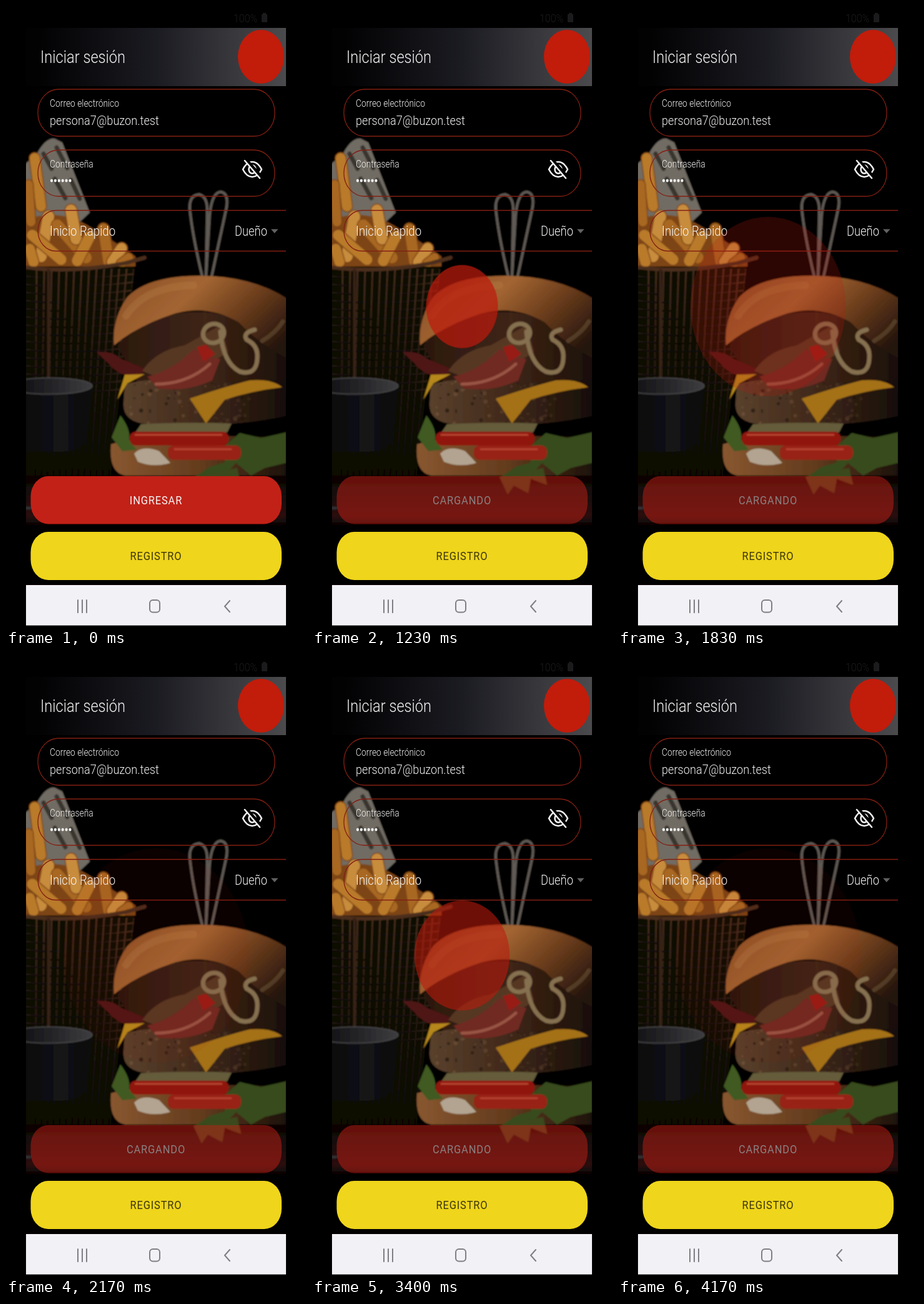
Recreate the animation shown at these times as an HTML page. Size 480 by 992 pixels, loop 4210 ms.

```html
<!DOCTYPE html>
<html lang="es">
<head>
<meta charset="utf-8">
<title>Iniciar sesión</title>
<style>
  html, body { margin: 0; width: 100%; height: 100%; overflow: hidden; background: #000; }
  svg { display: block; width: 100%; height: 100%; }
  text { font-family: Roboto, "Open Sans", sans-serif; font-weight: 300; fill: #f4f4f4; }
  .caps { font-size: 19px; letter-spacing: 1px; text-anchor: middle; font-weight: 400; }
  .field { fill: none; stroke: #821f12; stroke-width: 1.3; }
  .line { fill: none; stroke-linecap: round; stroke-linejoin: round; }
  #pulse { transform-origin: 240px 480px; opacity: 0; }
</style>
</head>
<body>
<svg viewBox="0 0 480 992">
  <defs>
    <linearGradient id="bar"><stop offset=".05" stop-color="#020203"/><stop offset=".5" stop-color="#1b1b22"/><stop offset="1" stop-color="#4b4b4e"/></linearGradient>
    <linearGradient id="bun" x1="0" y1=".2" x2="1" y2=".7"><stop stop-color="#8d5228"/><stop offset=".35" stop-color="#a36532"/><stop offset=".65" stop-color="#6b3d1c"/><stop offset="1" stop-color="#20120b"/></linearGradient>
    <linearGradient id="base"><stop stop-color="#885730"/><stop offset=".5" stop-color="#623b1d"/><stop offset="1" stop-color="#150d08"/></linearGradient>
    <linearGradient id="meat"><stop stop-color="#59412d"/><stop offset=".45" stop-color="#422a1b"/><stop offset="1" stop-color="#170e08"/></linearGradient>
    <linearGradient id="filling"><stop stop-color="#2b1810"/><stop offset=".5" stop-color="#3f2515"/><stop offset="1" stop-color="#170d08"/></linearGradient>
    <linearGradient id="mesh" x1="0" y1="0" x2="0" y2="1"><stop stop-color="#4a3020"/><stop offset=".5" stop-color="#271a12"/><stop offset="1" stop-color="#080504"/></linearGradient>
    <linearGradient id="bowl"><stop stop-color="#09090b"/><stop offset=".6" stop-color="#141417"/><stop offset="1" stop-color="#070708"/></linearGradient>
    <linearGradient id="inside"><stop stop-color="#09090c"/><stop offset="1" stop-color="#3d3d40"/></linearGradient>
    <linearGradient id="table" x1="0" y1="0" x2="0" y2="1"><stop stop-color="#020202"/><stop offset=".2" stop-color="#180a09"/><stop offset=".38" stop-color="#2c100f"/><stop offset=".46" stop-color="#050303"/><stop offset="1" stop-color="#070707"/></linearGradient>
    <filter id="soft" x="0" y="0" width="480" height="992" filterUnits="userSpaceOnUse"><feGaussianBlur stdDeviation="1"/></filter>
    <clipPath id="phone"><path d="M32 35H448V925H32Z"/></clipPath>
    <clipPath id="basketClip"><path d="M32 420H205L168 750H32Z"/></clipPath>
    <clipPath id="pattyClip"><path id="patty" d="M190 605Q230 590 300 604L448 596V655Q350 676 225 668Q186 664 188 634Z"/></clipPath>
  </defs>

  <rect width="480" height="992"/>
  <g clip-path="url(#phone)">
    <g filter="url(#soft)">
      <rect x="20" y="35" width="440" height="900" fill="#020202"/>
      <rect x="20" y="740" width="440" height="195" fill="url(#table)"/>
      <path d="M20 802H40" stroke="#303036" stroke-width="4"/>

      <!-- paper and fries -->
      <path d="M50 235Q64 210 78 212L90 218L134 330L70 390H20V262Z" fill="#716c64"/>
      <path d="M60 236l13 24M81 226l17 33M78 276l17 31M104 278l14 30" stroke="#38342f" stroke-width="7" class="line"/>
      <path d="M20 345Q80 320 130 350T207 400V416H20Z" fill="#7d4515"/>
      <g id="fries" class="line"></g>

      <!-- basket and bowl -->
      <path d="M20 416H205L168 750H20Z" fill="#0d0806"/>
      <g id="basket" clip-path="url(#basketClip)" stroke="url(#mesh)" stroke-width="2.4"></g>
      <path d="M20 416Q100 428 190 411L222 402" class="line" stroke="#4b2f1d" stroke-width="6"/>
      <path d="M68 420V600" stroke="#392417" stroke-width="5"/>
      <path d="M20 607H138L130 690Q122 711 90 712H20Z" fill="url(#bowl)"/>
      <ellipse cx="70" cy="607" rx="68" ry="13" fill="url(#inside)" stroke="#48484a" stroke-width="1.5"/>

      <!-- skewer -->
      <path d="M314 432Q298 365 294 324Q293 302 309 301Q322 304 322 326L320 432L326 332Q330 297 344 297Q356 299 353 321L329 432" class="line" stroke="#605a54" stroke-width="4"/>

      <!-- burger -->
      <path d="M168 700Q230 680 460 690V750H190Q164 745 168 700Z" fill="url(#base)"/>
      <path d="M178 542Q240 480 330 490L460 520V620H220Z" fill="url(#filling)"/>
      <use href="#patty" fill="url(#meat)"/>
      <g id="grain" clip-path="url(#pattyClip)"></g>
      <path d="M173 542Q169 500 194 465Q226 431 310 431Q400 431 460 474V568Q410 545 372 505Q318 474 262 494Q207 513 173 542Z" fill="url(#bun)"/>
      <path d="M192 495Q222 448 300 446" class="line" stroke="#bb8148" stroke-width="12" opacity=".3"/>
      <path d="M145 553Q170 550 183 563L221 579L214 596Q178 590 164 571Z" fill="#4f1512"/>
      <path d="M218 583Q240 550 286 542L343 510L355 552Q325 578 290 565L240 592Z" fill="#573721"/>
      <path d="M226 592Q270 581 300 548Q320 560 343 564L330 598Q290 617 243 611Z" fill="#702a22"/>
      <path d="M240 604Q290 604 326 572" class="line" stroke="#985544" stroke-width="5"/>
      <path d="M305 545L320 541L335 556L316 568Z" fill="#981c16"/>
      <g class="line" stroke="#857050" stroke-width="7">
        <ellipse cx="332" cy="523" rx="17" ry="15" transform="rotate(-20 332 523)"/>
        <path d="M343 520Q347 570 374 584Q401 591 402 563Q404 542 385 533Q378 522 398 517"/>
        <path d="M410 535Q432 522 443 504" opacity=".35"/>
      </g>
      <path d="M178 629L190 589L222 588L194 603Z" fill="#b6881c"/>
      <path d="M294 627Q354 607 390 598Q425 595 442 609Q392 615 350 629L320 667Z" fill="#a47119"/>
      <path d="M216 668Q300 664 361 667L354 681H207Z" fill="#655b3a"/>
      <path d="M183 654Q200 676 197 693L209 709L186 711L169 689Z" fill="#3f5a20"/>
      <path d="M350 703L374 682L408 690L448 681V730L414 738L392 750L368 730L347 752L303 752L326 736L350 729Z" fill="#374b1e"/>
      <path d="M300 752L313 780L323 766L346 778L350 755L376 765L370 738Z" fill="#3b481d"/>
      <path d="M205 715Q218 701 245 711L263 730Q235 738 211 728Z" fill="#b2a491"/>
      <rect x="198" y="680" width="158" height="22" rx="9" fill="#901811"/>
      <rect x="259" y="702" width="117" height="23" rx="9" fill="#982016"/>
      <path d="M207 685H345M270 708H360" stroke="#b64333" stroke-width="3" class="line"/>
    </g>

    <!-- form -->
    <rect x="32" y="35" width="416" height="93" fill="url(#bar)"/>
    <ellipse cx="408" cy="81" rx="37" ry="43" fill="#c21c0b"/>
    <rect class="field" x="51" y="133" width="379" height="75" rx="33" ry="37"/>
    <rect class="field" x="51" y="230" width="379" height="74" rx="33" ry="37"/>
    <rect class="field" x="51" y="326.500" width="430" height="65" rx="29" ry="32.500"/>
    <g id="dots" fill="#f4f4f4"></g>
    <g class="line" stroke="#f4f4f4" stroke-width="2.500">
      <path d="M379 261Q385 249 394 249T409 261Q403 273 394 273T379 261Z"/>
      <ellipse cx="394" cy="261" rx="5.500" ry="6.500"/>
      <path d="M384 246L409 274" stroke="#020202" stroke-width="6"/>
      <path d="M382 247L406 275"/>
    </g>
    <path d="M424 356.500H435.500L429.700 363Z" fill="#626265"/>
  </g>

  <g id="labels"></g>

  <ellipse id="pulse" cx="240" cy="480" rx="156" ry="180" fill="#bd1b0d"/>

  <g id="enter">
    <rect x="39.500" y="751" width="401.500" height="76.500" rx="28" ry="32.500" fill="#c22117"/>
    <text id="enterText" class="caps" transform="translate(240 795.500) scale(.865 1)"></text>
  </g>
  <rect x="39.500" y="840" width="401.500" height="77" rx="28" ry="32.500" fill="#efd51b"/>
  <text class="caps" transform="translate(240 885) scale(.865 1)" style="fill:#3d370e">REGISTRO</text>

  <rect x="32" y="925" width="416" height="64.500" fill="#f2f2f6"/>
  <g class="line" stroke="#7e7e84" stroke-width="2">
    <path d="M115 949V969M122 949V969M129 949V969M358 950L350 959L358 968"/>
    <rect x="230" y="949" width="16" height="19.500" rx="5"/>
  </g>
  <g fill="#1b1b1d"><rect x="409" y="13" width="9" height="13" rx="1"/><rect x="411" y="11" width="5" height="3"/></g>
</svg>

<script>
const $ = id => document.getElementById(id);
const SQUEEZE = 0.865; // the screen is shown narrower than it was laid out
const LOOP = 4210, PRESS = 500;

function add(parent, tag, attrs) {
  const el = document.createElementNS("http://www.w3.org/2000/svg", tag);
  for (const key in attrs) el.setAttribute(key, attrs[key]);
  return parent.appendChild(el);
}

// x, baseline, size, content, colour
const labels = [
  [55, 91, 27.3, "Iniciar sesión"],
  [70, 161, 16, "Correo electrónico"],
  [70, 190, 21, "persona7@buzon.test"],
  [70, 258, 16, "Contraseña"],
  [70, 367, 21.5, "Inicio Rapido"],
  [366, 367, 21.2, "Dueño"],
  [364, 26, 18.5, "100%", "#1b1b1d"],
];
for (const [x, y, size, words, color] of labels) {
  const el = add($("labels"), "text", {
    transform: `translate(${x} ${y}) scale(${SQUEEZE} 1)`, "font-size": size });
  el.textContent = words;
  if (color) el.style.fill = color;
}

for (let i = 0; i < 6; i++) add($("dots"), "ellipse", { cx: 73 + i * 5.9, cy: 279, rx: 2.1, ry: 2.4 });

// x1, y1, x2, y2, width
const fries = [
  [46, 243, 56, 320, 16], [36, 285, 40, 345, 14], [68, 336, 56, 400, 18],
  [42, 366, 88, 405, 17], [82, 350, 128, 402, 18], [104, 326, 112, 372, 18],
  [134, 368, 114, 407, 17], [156, 356, 164, 408, 17], [185, 387, 170, 409, 17],
  [38, 388, 44, 409, 16], [196, 402, 184, 411, 14],
];
fries.forEach(([x1, y1, x2, y2, w], i) => {
  const d = `M${x1} ${y1}L${x2} ${y2}`;
  add($("fries"), "path", { d, stroke: "#7d4515", "stroke-width": w + 3 });
  add($("fries"), "path", { d, stroke: ["#b97a2c", "#a86720", "#c88c3c"][i % 3], "stroke-width": w });
});

for (let i = 0; i < 15; i++) {
  const x = 37 + i * 12, y = 432 + i * 13;
  add($("basket"), "path", { d: `M${x} 420L${x - i * 2.2} 750` });
  add($("basket"), "path", { d: `M32 ${y}Q110 ${y + 8} 206 ${y - 4}`, fill: "none" });
}

let seed = 7;
const random = () => (seed = seed * 16807 % 2147483647) / 2147483647;
for (let i = 0; i < 110; i++) {
  const x = 190 + random() * 200;
  add($("grain"), "circle", { cx: x, cy: 598 + random() * 70, r: 1 + random() * 2.5,
    fill: random() < 0.5 ? "#150b06" : "#7a5a40", opacity: 0.6 - (x - 190) / 450 });
}

const pulse = $("pulse").animate([
  { transform: "scale(.125)", opacity: 1 },
  { transform: "scale(1)", opacity: 0 },
], { duration: 2000, easing: "ease-in-out", iterations: Infinity });
pulse.pause();

function draw(t) {
  const loading = t >= PRESS;
  $("enter").setAttribute("opacity", loading ? 0.5 : 1);
  $("enterText").textContent = loading ? "CARGANDO" : "INGRESAR";
  pulse.currentTime = t - PRESS; // negative before the press: still hidden
}

const begin = performance.now();
function tick() {
  draw((performance.now() - begin) % LOOP);
  requestAnimationFrame(tick);
}
tick();
</script>
</body>
</html>
```
